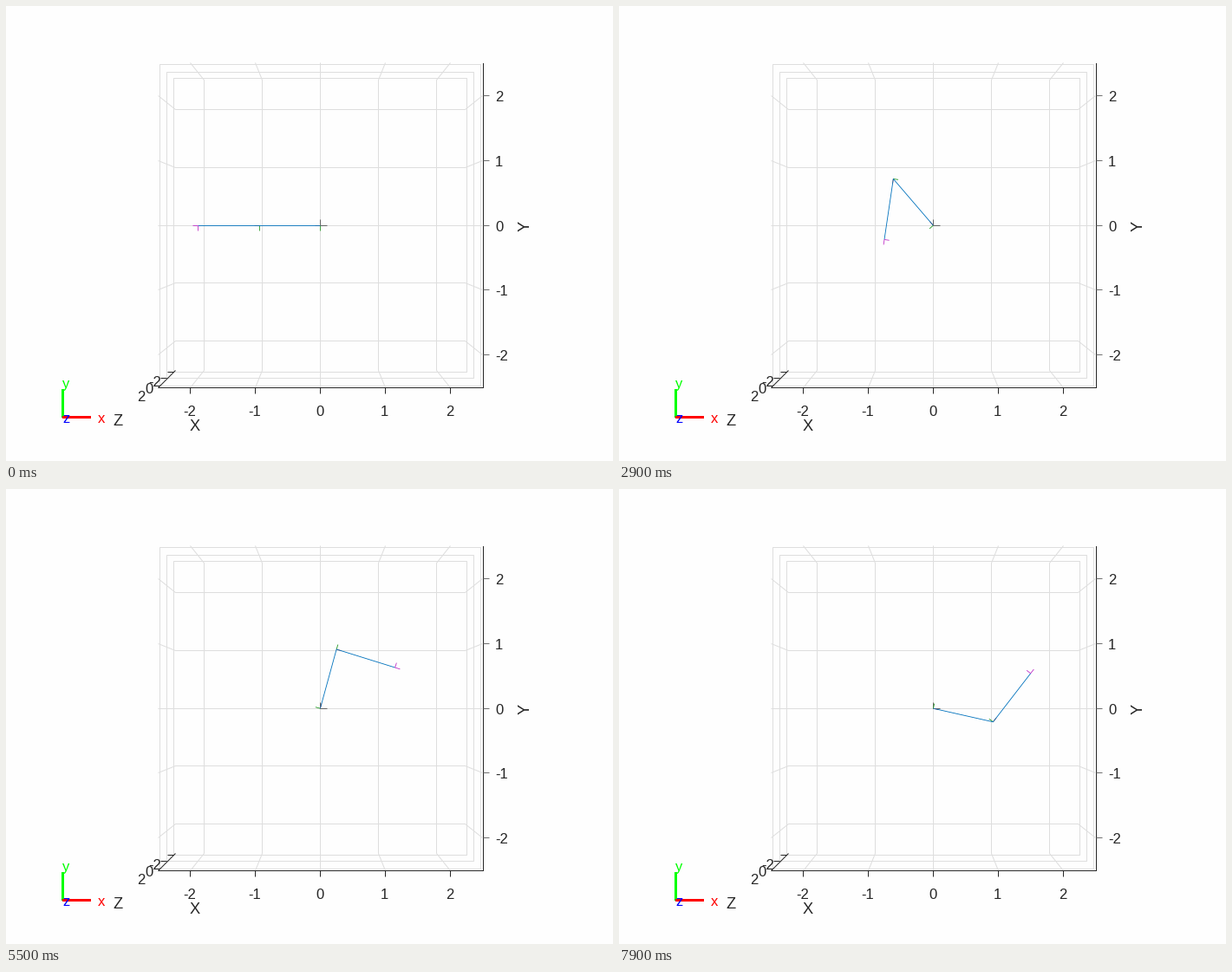
A matplotlib script that plays this animation: 700 px wide and 525 px high, repeating every 8000 ms.

```python
import numpy as np
import matplotlib.pyplot as plt
from matplotlib.animation import FuncAnimation

W, H, DPI = 700, 525, 100
FRAMES, STEP = 80, 100
PX = 72 / DPI                     # one pixel in points
CX, CY = 362.5, 253.0             # projected origin
UNIT, EYE, LIM = 70.75, 44.4, 2.5  # pixels per unit at z = 0, camera distance
INK, GRID = "#262626", "#dedede"
BLUE, RED, GREEN, MAGENTA = "#0072bd", "#c05050", "#259a25", "#c030c8"

plt.rcParams["font.family"] = "Liberation Sans"

fig = plt.figure(figsize=(W / DPI, H / DPI), dpi=DPI, facecolor="#fefefe")
ax = fig.add_axes([0, 0, 1, 1])
ax.set_xlim(0, W)
ax.set_ylim(H, 0)
ax.axis("off")


def project(x, y, z=0.0):
    """Perspective view, moved to pixel centres."""
    s = UNIT * EYE / (EYE - z)
    return np.floor(CX + s * x) + 0.5, np.floor(CY - s * y) + 0.5


def line(points, color, width=1.0, **kw):
    xs, ys = zip(*points)
    kw.setdefault("snap", False)
    return ax.plot(xs, ys, color=color, lw=width * PX,
                   solid_capstyle="butt", **kw)[0]


def text(x, y, s, size=16.67, color=INK, ha="center", **kw):
    kw.setdefault("va", "baseline")
    ax.text(x, y, s, fontsize=size * PX, color=color, ha=ha, **kw)


def draw_box():
    for z in (-2, 0, 2):
        corners = [(-LIM, -LIM), (LIM, -LIM), (LIM, LIM), (-LIM, LIM), (-LIM, -LIM)]
        line([project(x, y, z) for x, y in corners], GRID)
    for k in range(-2, 3):
        rail = [(-LIM, LIM), (-LIM, -LIM), (LIM, -LIM), (LIM, LIM)]
        line([project(k, e, z) for e, z in rail], GRID)
        line([project(e, k, z) for e, z in rail], GRID)


def draw_rulers():
    left, bottom = project(-LIM, -LIM, LIM)
    right, top = 550.5, 66
    line([(left, bottom), (right + 0.5, bottom)], INK)
    line([(right, bottom), (right, top)], INK)
    line([(left, bottom), project(-LIM, -LIM, -LIM)], INK)
    for k in range(-2, 3):
        x, y = project(k, k, LIM)
        line([(x, bottom), (x, bottom + 7)], INK)
        line([(right, y), (right + 7, y)], "#707070")
        text(x - 0.9, 473, str(k))
        text(564, y + 6.3, str(k), ha="left")
    for z, tx, ty in ((-2, 179, 439), (0, 169.5, 447), (2, 160.5, 455.5)):
        x, y = project(-LIM, -LIM, z)
        line([(x - 7, y), (x, y)], INK)
        text(tx, ty, str(z), ha="right")
    text(217.5, 489.5, "X", 18.3)
    text(129.5, 484.5, "Z", 18.3)
    text(599.5, 253.5, "Y", 18.3, va="center", rotation=90)


def draw_compass():
    line([(65.5, 442), (65.5, 475)], "#00ff00", 3)
    line([(65, 474.5), (98, 474.5)], "#ff0000", 3)
    text(69, 481, "z", color="#0000ff")
    text(110, 481, "x", color="#ff0000")
    text(69, 440.5, "y", color="#00ff00")


# Link headings in degrees at a few times, in seconds
T = np.array([0, 0.9, 1.8, 2.7, 3.6, 4.5, 5.4, 6.5, 7.2, 7.9])
UPPER = np.array([180, 171.5, 153.6, 134.5, 117.6, 99.6, 77.5, 42.3, 17, -12.7])
FORE = np.array([180, 193, 223, 254.5, 286.1, 314, 339.8, 371.7, 391.8, 412.3])


def heading(t, knots):
    """Smooth Hermite curve through the knots, starting at rest."""
    slope = np.gradient(knots, T)
    slope[0] = 0
    i = min(np.searchsorted(T, t, side="right") - 1, len(T) - 2)
    h = T[i + 1] - T[i]
    s = (t - T[i]) / h
    rise = s * s * (3 - 2 * s)
    deg = (knots[i] + rise * (knots[i + 1] - knots[i])
           + h * (s * (1 - s) ** 2 * slope[i] - s * s * (1 - s) * slope[i + 1]))
    return np.radians(deg)


def ahead(p, angle, dist):
    return p[0] + dist * np.cos(angle), p[1] - dist * np.sin(angle)


def put(art, *points):
    art.set_data(*zip(*points))


draw_box()
draw_rulers()
draw_compass()

base = (CX - 0.1, CY + 0.2)


def mover(color, order, width=0.85):
    return line([base, base], color, width, zorder=order, snap=None)


for angle, size in ((0, 7.5), (np.pi / 2, 7.7)):
    put(mover("#505050", 3), base, ahead(base, angle, size))
base_axes = [mover(RED, 3), mover(GREEN, 3)]
elbow_axes = [mover(RED, 3), mover(GREEN, 3)]
arm = mover(BLUE, 4)
tip_axes = [mover(MAGENTA, 5), mover(MAGENTA, 5)]


def place(pair, p, angle):
    put(pair[0], p, ahead(p, angle, 6))
    put(pair[1], p, ahead(p, angle + np.pi / 2, 5.7))


def update(n):
    t = n * STEP / 1000
    a, b = heading(t, UPPER), heading(t, FORE)
    elbow = ahead(base, a, UNIT)
    tip = ahead(elbow, b, UNIT)
    put(arm, base, elbow, tip)
    place(base_axes, base, a)
    place(elbow_axes, elbow, b)
    place(tip_axes, tip, b)
    return [arm, *base_axes, *elbow_axes, *tip_axes]


anim = FuncAnimation(fig, update, frames=FRAMES, interval=STEP,
                     init_func=lambda: update(0), repeat=True, repeat_delay=0)
plt.show()
```
